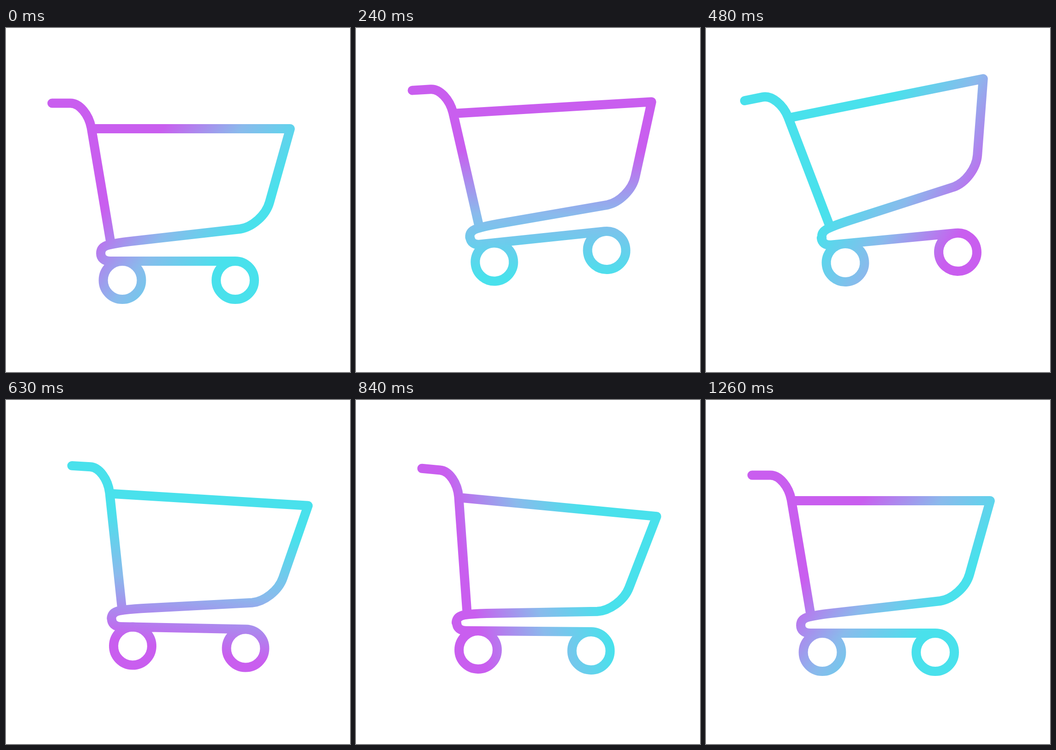
Recreate the animation shown at these times as an HTML page with a canvas. Size 748 by 748 pixels, loop 3290 ms.

```html
<!DOCTYPE html>
<html lang="en">
<head>
<meta charset="utf-8">
<title>Shopping cart</title>
<style>
html, body { margin: 0; width: 100%; height: 100%; overflow: hidden; background: #fff; }
canvas { display: block; width: 100vw; height: 100vh; }
</style>
</head>
<body>
<canvas id="stage" width="748" height="748"></canvas>
<script>
const ctx = document.getElementById('stage').getContext('2d');
const LOOP = 3290, STEP = 30, END = 1260;

const basket = new Path2D(
  'M100 163.5H140C160 163.5 180 188 185.5 217L227 463' +
  'M190 219H618L573 379C565 408 535 433 509 437L270 464' +
  'Q240 467.5 222 472C211 475 206 481 206 490');
const base = new Path2D('M206 490C206 500 213 507 226 507H498');
for (const x of [253, 498.5]) {
  base.moveTo(x + 41.5, 548.5);
  base.arc(x, 548.5, 41.5, 0, 2 * Math.PI);
}

// Key poses of the base: time, x, y, tilt in degrees.
const poses = [
  [0, 0, 0, 0],
  [240, 42, -35.5, -5.95],
  [480, 44.7, -34.4, -5.4],
  [630, 23.7, -14.2, 1.17],
  [840, 13, -5.3, 0.47],
  [1050, 1.5, -4.5, 0],
  [END, 0, 0, 0],
];

// Smooth curve through the poses, at rest at both ends.
function basePose(t) {
  const last = poses.length - 1;
  const i = Math.max(0, poses.findIndex(p => p[0] >= t) - 1);
  const [p, q] = [poses[i], poses[i + 1]];
  const d = q[0] - p[0], u = (t - p[0]) / d, w = 1 - u;
  const slope = (j, k) => j % last
    ? (poses[j + 1][k] - poses[j - 1][k]) / (poses[j + 1][0] - poses[j - 1][0]) : 0;
  return [1, 2, 3].map(k =>
    p[k] * w * w * (1 + 2 * u) + q[k] * u * u * (3 - 2 * u)
    + d * u * w * (slope(i, k) * w - slope(i + 1, k) * u));
}

// The basket rocks on the base in half sine waves: start, end, degrees.
const swings = [[0, 290, 5], [290, 592, -6.5], [592, 930, 6.7], [930, 1120, -0.9]];
function rock(t) {
  const [from, to, size] = swings.find(s => t < s[1]) || [0, 1, 0];
  return size * Math.sin(Math.PI * (t - from) / (to - from));
}

// Cubic Bezier easing with handles (x1, 0) and (x2, 1).
function ease(x, x1, x2) {
  let s = 0.5;
  for (let step = 0.25; step > 1e-5; step /= 2) {
    const at = 3 * s * (1 - s) * ((1 - s) * x1 + s * x2) + s ** 3;
    s += at < x ? step : -step;
  }
  return s * s * (3 - 2 * s);
}

const pivot = (matrix, x, y, angle) => matrix.translate(x, y).rotate(angle).translate(-x, -y);

function paint(t) {
  const [x, y, tilt] = basePose(t);
  const basePlace = pivot(new DOMMatrix().translate(x, y), 217, 490, tilt);
  const basketPlace = pivot(basePlace, 214, 476, rock(t));
  const cart = new Path2D();
  cart.addPath(base, basePlace);
  cart.addPath(basket, basketPlace);

  // The gradient makes one full turn.
  const turn = (36.3 + 360 * ease(t / END, 0.28, 0.43)) * Math.PI / 180;
  const cx = 374 + x, cy = 405;
  const dx = 138 * Math.cos(turn), dy = 138 * Math.sin(turn);
  const ink = ctx.createLinearGradient(cx - dx, cy - dy, cx + dx, cy + dy);
  ['#c95eef', '#8abaec', '#49e1ec'].forEach((c, i) => ink.addColorStop(i / 2, c));

  ctx.fillStyle = '#fff';
  ctx.fillRect(0, 0, 748, 748);
  ctx.strokeStyle = ink;
  ctx.lineWidth = 20;
  ctx.lineCap = ctx.lineJoin = 'round';
  ctx.stroke(cart);
}

const start = performance.now();
function tick() {
  const t = (performance.now() - start) % LOOP;
  paint(Math.min(Math.floor(t / STEP) * STEP, END));
  requestAnimationFrame(tick);
}
tick();
</script>
</body>
</html>
```
